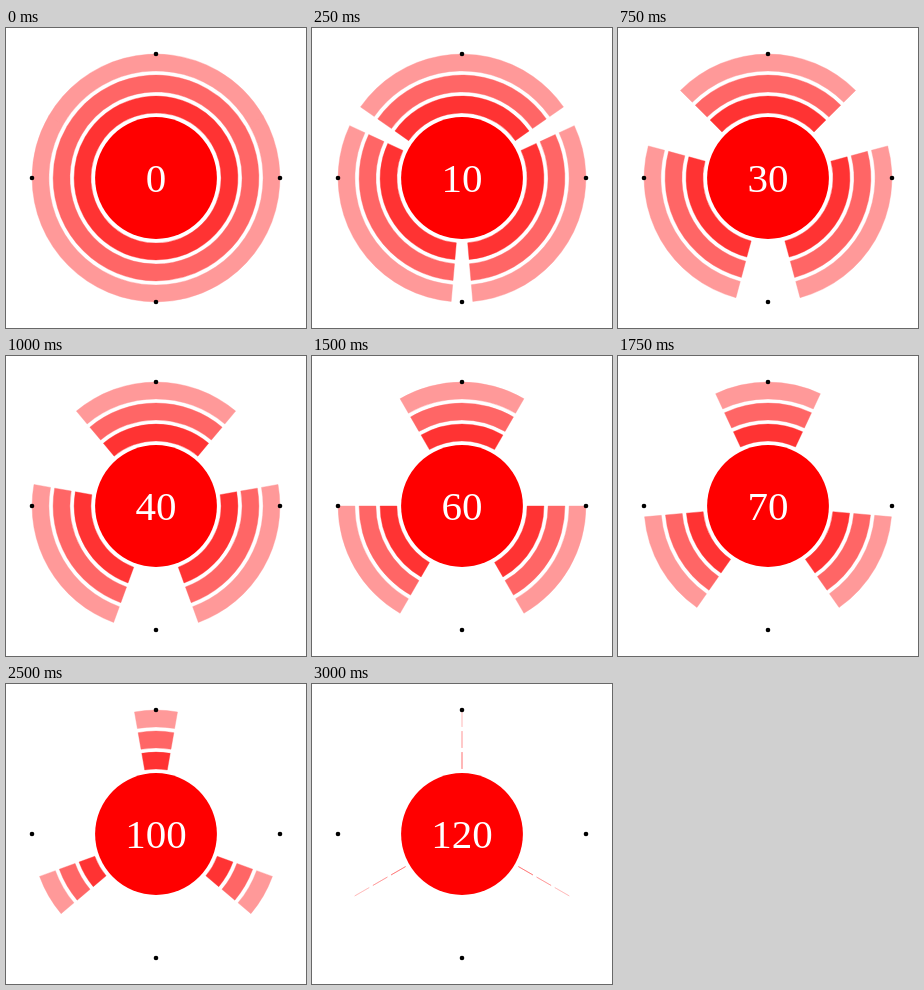
Animation, 300 px wide and 300 px high, one loop 3.25 s. Source, as an HTML page with a canvas:

```html
<!DOCTYPE html>
<html lang="en">
<head>
<meta charset="utf-8">
<title>Shrinking sectors</title>
<style>
  html, body { margin: 0; overflow: hidden; background: #fff; }
  canvas { display: block; }
</style>
</head>
<body>
<canvas id="stage" width="300" height="300"></canvas>
<script>
const ctx = document.getElementById('stage').getContext('2d');
const STEP_MS = 250, STEPS = 13;
const C = 150, UNIT = 21, GAP = 4.2, DOT_ORBIT = 124;
const rad = deg => deg * Math.PI / 180;

function disc(x, y, r, color) {
  ctx.fillStyle = color;
  ctx.beginPath();
  ctx.arc(x, y, r, 0, 2 * Math.PI);
  ctx.fill();
}

// Three equal ring sectors; the thin stroke keeps them visible at zero width.
function sectors(inner, outer, half, color) {
  ctx.fillStyle = ctx.strokeStyle = color;
  ctx.lineWidth = 0.4;
  ctx.beginPath();
  for (const mid of [-90, 30, 150]) {
    const from = rad(mid - half), to = rad(mid + half);
    ctx.moveTo(C + inner * Math.cos(from), C + inner * Math.sin(from));
    ctx.arc(C, C, outer, from, to);
    ctx.arc(C, C, inner, to, from, true);
    ctx.closePath();
  }
  ctx.fill();
  ctx.stroke();
}

function draw(angle) {
  ctx.fillStyle = '#fff';
  ctx.fillRect(0, 0, 300, 300);
  ['#f33', '#f66', '#f99'].forEach((color, i) => {
    const r = UNIT * (3 + i);
    sectors(r + GAP / 2, r + UNIT - GAP / 2, (120 - angle) / 2, color);
  });
  disc(C, C, 3 * UNIT - GAP / 2, '#f00');
  for (const [x, y] of [[1, 0], [0, 1], [-1, 0], [0, -1]]) {
    disc(C + DOT_ORBIT * x, C + DOT_ORBIT * y, 2.3, '#000');
  }
  ctx.fillStyle = '#fff';
  ctx.font = '41px "Liberation Serif", serif';
  ctx.textAlign = 'center';
  ctx.fillText(angle, C, 164);
}

function tick() {
  draw(10 * (Math.floor(performance.now() / STEP_MS) % STEPS));
  requestAnimationFrame(tick);
}
tick();
</script>
</body>
</html>
```
